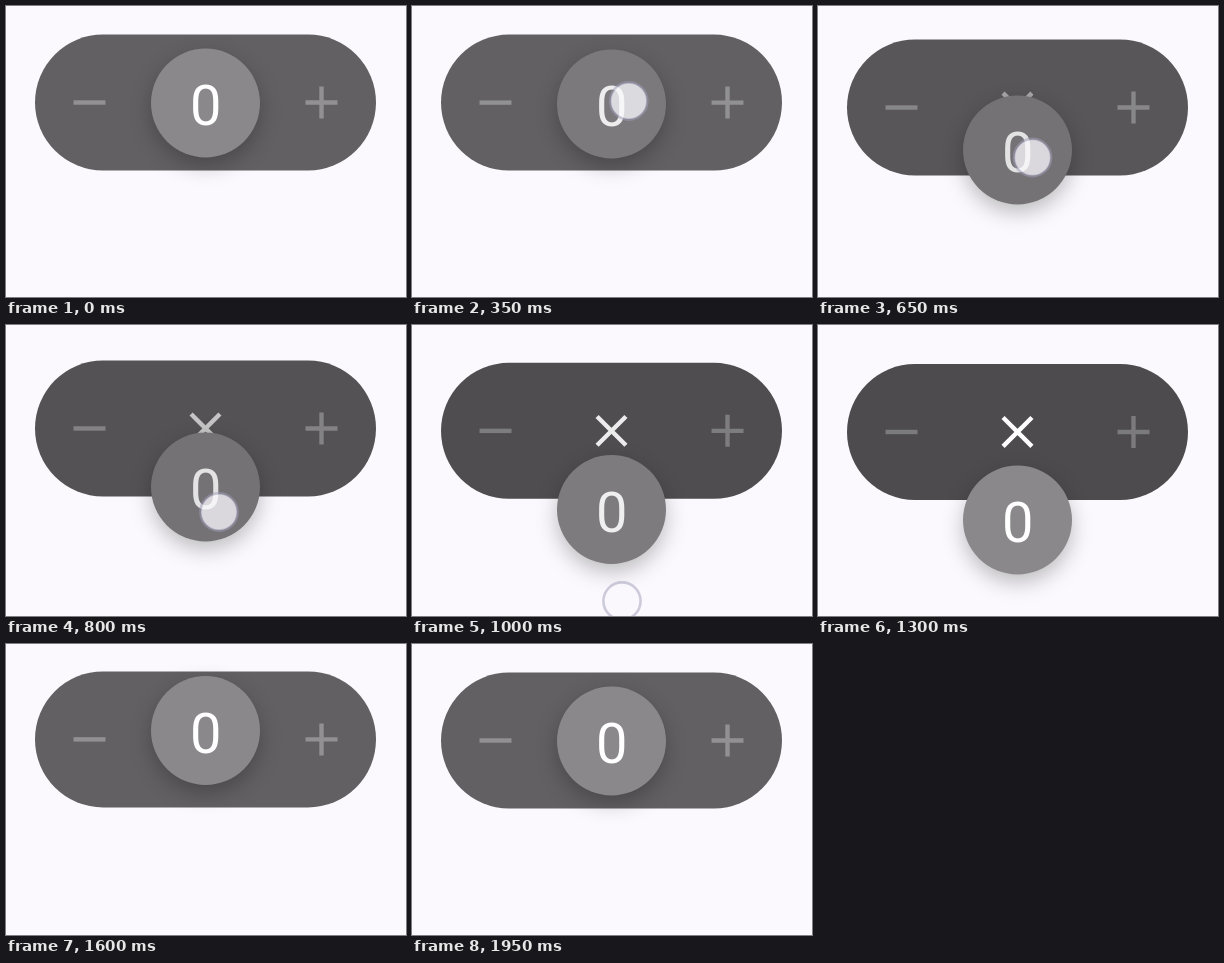
Write an HTML page with a canvas that moves like this. It is 400 px wide and 291 px high and loops after 2150 ms.

```html
<!DOCTYPE html>
<html lang="en">
<head>
<meta charset="utf-8">
<title>Counter button</title>
<style>
  html, body { margin: 0; width: 100%; height: 100%; overflow: hidden; background: #fbf9fd; }
  canvas { display: block; width: 400px; height: 291px; }
</style>
</head>
<body>
<canvas id="stage"></canvas>
<script>
const W = 400, H = 291, LOOP = 2150, STEP = 50;
const CX = 199.5, PILL_Y = 96.5, KNOB_Y = 97, KNOB_R = 54.5, MAX_DRAG = 98;

// Each track is a list of [time, value].
const drag = [[300, 0], [350, 1], [400, 8], [500, 29], [800, 65], [1000, 87.5], [1150, 95],
  [1300, 98], [1350, 28], [1400, -8], [1450, -15], [1500, -16], [1600, -10.5],
  [1700, -5], [1800, -2], [1900, -0.3], [1950, 0]];
const fingerX = [[300, 217], [500, 216], [800, 213], [1000, 210]];
const fingerY = [[300, 92], [400, 98], [500, 116], [800, 187], [1000, 276], [1100, 322]];
const touch = [[250, 0], [350, 1], [1050, 1], [1100, 0]];
const press = [[250, 0], [400, 1], [850, 1], [1000, 0.6], [1200, 0]];

const canvas = document.getElementById('stage');
const ctx = canvas.getContext('2d');
const ratio = window.devicePixelRatio || 1;
canvas.width = Math.round(W * ratio);
canvas.height = Math.round(H * ratio);

const mix = (a, b, p) => a + (b - a) * p;
const white = a => `rgba(255,255,255,${a})`;
const tint = v => `rgb(${v + 1},${v - 1},${v + 2})`;

function at(track, t) {
  if (t <= track[0][0]) return track[0][1];
  for (let i = 1; i < track.length; i++) {
    const [t0, v0] = track[i - 1], [t1, v1] = track[i];
    if (t <= t1) return mix(v0, v1, (t - t0) / (t1 - t0));
  }
  return track[track.length - 1][1];
}

function disc(x, y, r, fill) {
  ctx.beginPath();
  ctx.arc(x, y, r, 0, Math.PI * 2);
  ctx.fillStyle = fill;
  ctx.fill();
}

function bar(x, y, length, angle, color) {
  ctx.save();
  ctx.translate(x, y);
  ctx.rotate(angle);
  ctx.fillStyle = color;
  ctx.fillRect(-length / 2, -2.2, length, 4.4);
  ctx.restore();
}

// Two bars as one path, so the overlap keeps the same opacity.
function cross(x, y, length, angle, color) {
  const a = length / 2, b = 2.2;
  ctx.save();
  ctx.translate(x, y);
  ctx.rotate(angle);
  ctx.beginPath();
  ctx.rect(-a, -b, 2 * a, 2 * b);
  ctx.rect(-b, -a, 2 * b, 2 * a);
  ctx.fillStyle = color;
  ctx.fill();
  ctx.restore();
}

function shadow(y, offset, blur, alpha) {
  ctx.save();
  ctx.shadowColor = `rgba(0,0,0,${alpha})`;
  ctx.shadowBlur = blur * ratio;
  ctx.shadowOffsetY = offset * ratio;
  disc(CX, y, KNOB_R - 1, '#747275');
  ctx.restore();
}

function drawPill(y, p) {
  ctx.beginPath();
  ctx.arc(97, y, 68, Math.PI / 2, Math.PI * 1.5);
  ctx.arc(302, y, 68, -Math.PI / 2, Math.PI / 2);
  ctx.closePath();
  ctx.fillStyle = tint(mix(97, 76, p));
  ctx.fill();

  const icon = white(mix(0.3, 0.26, p));
  bar(83.5, y, 32, 0, icon);
  cross(315.5, y, 32, 0, icon);
  if (p > 0) cross(CX, y, 40.8, Math.PI / 4, white(p));
}

function drawKnob(y, pressed) {
  shadow(y, 8, 22, 0.27);
  disc(CX, y, KNOB_R, tint(mix(137, 115, pressed)));
  ctx.font = '56px Roboto, sans-serif';
  ctx.textAlign = 'center';
  ctx.textBaseline = 'alphabetic';
  ctx.fillStyle = white(mix(1, 0.8, pressed));
  ctx.fillText('0', CX + 0.2, y + 22);
}

function drawTouch(x, y, alpha) {
  if (!alpha) return;
  ctx.save();
  ctx.globalAlpha = alpha;
  disc(x, y, 18, 'rgba(250,249,253,0.76)');
  ctx.beginPath();
  ctx.arc(x, y, 18.6, 0, Math.PI * 2);
  ctx.lineWidth = 2.6;
  ctx.strokeStyle = 'rgba(160,157,185,0.5)';
  ctx.stroke();
  ctx.restore();
}

function draw(t) {
  const d = at(drag, t);
  const p = Math.max(0, d / MAX_DRAG);
  ctx.setTransform(ratio, 0, 0, ratio, 0, 0);
  ctx.fillStyle = '#fbf9fd';
  ctx.fillRect(0, 0, W, H);
  drawPill(PILL_Y + d * 0.107, p);
  drawKnob(KNOB_Y + d, at(press, t));
  drawTouch(at(fingerX, t), at(fingerY, t), at(touch, t));
}

const start = performance.now();
function tick() {
  const t = (performance.now() - start) % LOOP;
  // The picture holds still at the start of the loop, then advances in even steps.
  draw(t < 300 ? 0 : Math.floor(t / STEP) * STEP);
  requestAnimationFrame(tick);
}
tick();
</script>
</body>
</html>
```
